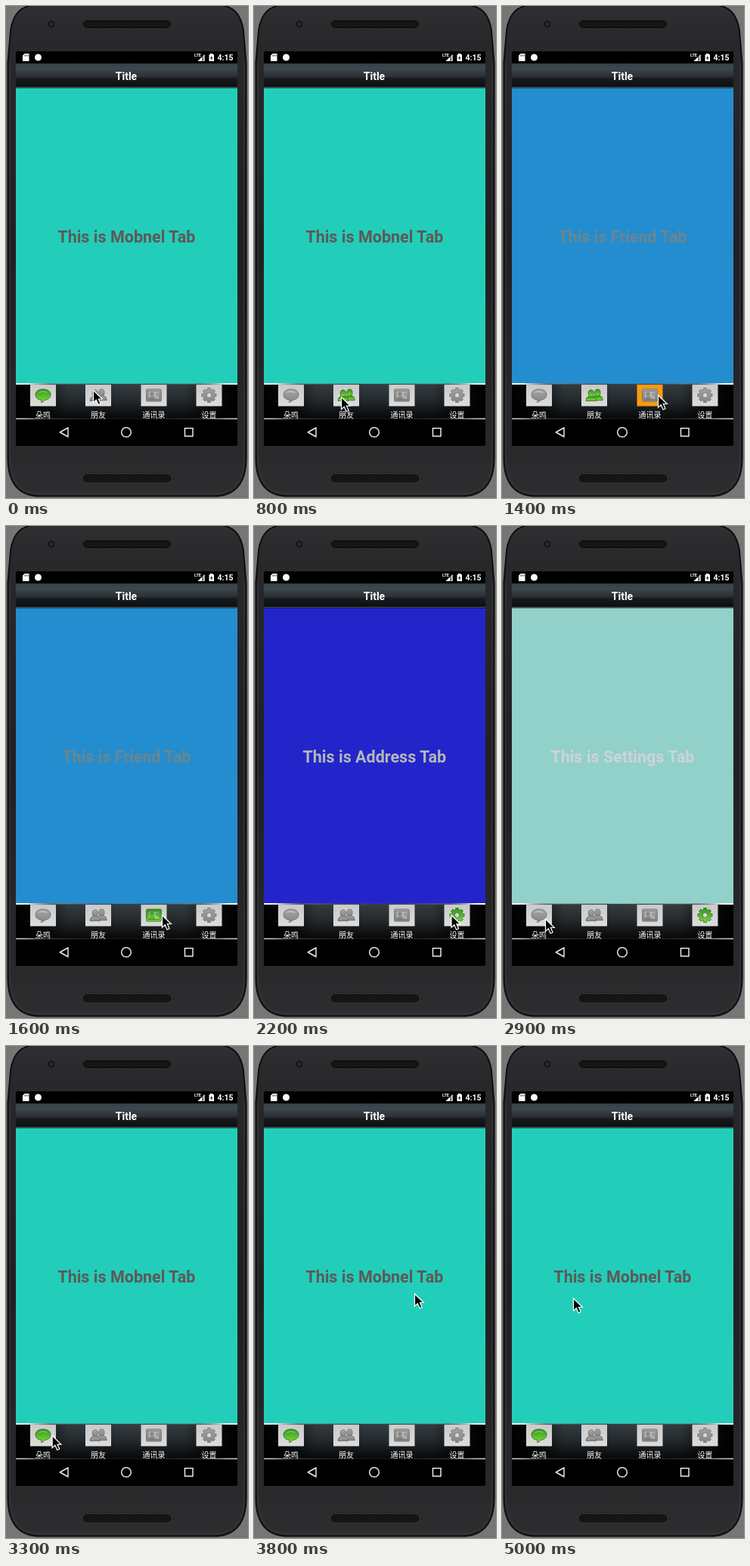
An HTML page for the animation above (5.1 s loop, 320 by 651 pixels).

```html
<!DOCTYPE html>
<html lang="en">
<head>
<meta charset="utf-8">
<title>Tab demo</title>
<style>
html, body { margin: 0; width: 100%; height: 100%; overflow: hidden; background: #777575; }
svg { display: block; width: 100%; height: 100%; }
text { font-family: Roboto, sans-serif; text-anchor: middle; }
.label { font: 10px "Noto Sans CJK SC", "Noto Sans CJK", sans-serif; fill: #fff; }
</style>
</head>
<body>
<svg id="stage" viewBox="0 0 320 651">
  <defs>
    <linearGradient id="body" x2="0" y2="1">
      <stop offset="0" stop-color="#303033"/>
      <stop offset=".06" stop-color="#29292c"/>
      <stop offset=".5" stop-color="#202022"/>
      <stop offset=".9" stop-color="#29292b"/>
      <stop offset="1" stop-color="#2d2d30"/>
    </linearGradient>
    <linearGradient id="bar" x2="0" y2="1">
      <stop offset="0" stop-color="#343f46"/>
      <stop offset=".2" stop-color="#3d484e"/>
      <stop offset=".55" stop-color="#293035"/>
      <stop offset=".62" stop-color="#171b1e"/>
      <stop offset="1" stop-color="#0c0e10"/>
    </linearGradient>
    <linearGradient id="tabs" x2="0" y2="1">
      <stop offset="0" stop-color="#353d42"/>
      <stop offset=".45" stop-color="#24292c"/>
      <stop offset="1" stop-color="#050607"/>
    </linearGradient>
    <linearGradient id="sides">
      <stop offset="0" stop-color="#000"/>
      <stop offset=".06" stop-color="#000" stop-opacity=".9"/>
      <stop offset=".24" stop-color="#000" stop-opacity="0"/>
      <stop offset=".76" stop-color="#000" stop-opacity="0"/>
      <stop offset=".94" stop-color="#000" stop-opacity=".9"/>
      <stop offset="1" stop-color="#000"/>
    </linearGradient>
    <linearGradient id="shine">
      <stop offset="0" stop-color="#fff"/>
      <stop offset=".05" stop-color="#eee"/>
      <stop offset=".17" stop-color="#777" stop-opacity=".5"/>
      <stop offset=".5" stop-color="#555" stop-opacity=".15"/>
      <stop offset=".83" stop-color="#777" stop-opacity=".5"/>
      <stop offset=".95" stop-color="#eee"/>
      <stop offset="1" stop-color="#fff"/>
    </linearGradient>
    <linearGradient id="tile" x2="0" y2="1">
      <stop offset="0" stop-color="#c9c9c9"/>
      <stop offset="1" stop-color="#dddddd"/>
    </linearGradient>
    <linearGradient id="gray" x2="0" y2="1">
      <stop offset="0" stop-color="#a6a6a6"/>
      <stop offset="1" stop-color="#858585"/>
    </linearGradient>
    <linearGradient id="green" x2="0" y2="1">
      <stop offset="0" stop-color="#2f9422"/>
      <stop offset="1" stop-color="#86dc35"/>
    </linearGradient>
    <pattern id="mesh" width="3" height="3" patternUnits="userSpaceOnUse">
      <rect width="3" height="3" fill="#121213"/>
      <circle cx="1.5" cy="1.5" r=".8" fill="#252527"/>
    </pattern>
  </defs>

  <rect width="320" height="651" fill="#777575"/>
  <path id="shell" d="M45 -2H275C301 -2 311 11 314 33L317.5 75V600C317 630 304 648.5 275 648.5H45C16 648.5 3 630 2.5 600V75L6 33C9 11 19 -2 45 -2Z" fill="url(#body)" stroke="#0d0d0e" stroke-width="2"/>
  <path d="M5.2 76V598C6 627 18 645.5 46 645.5H274C302 645.5 314 627 314.8 598V76" fill="none" stroke="#3b3b3e"/>
  <circle cx="60" cy="24" r="4.5" fill="#18181a"/>
  <circle cx="60" cy="24" r="2" fill="#2f2f36"/>
  <g fill="url(#mesh)" stroke="#09090a">
    <rect x="102.5" y="19.5" width="115" height="9" rx="4.5"/>
    <rect x="102.5" y="620.5" width="115" height="9" rx="4.5"/>
  </g>

  <rect x="13" y="60" width="293" height="522"/>
  <g fill="#fff">
    <path d="M24.5 63H30.5V73H22V65.5Z"/>
    <path d="M25 64.5V66.5M27 64.5V66.5M29 64.5V66.5" stroke="#000" stroke-width=".8"/>
    <circle cx="42.5" cy="68" r="4.5"/>
    <text x="253.5" y="67" font-size="5.5" font-weight="700">LTE</text>
    <path d="M262.5 64V73H253.5Z" fill="#777"/>
    <path d="M259 67.5V73H253.5Z"/>
    <path d="M262.5 64V73H261.3V65Z"/>
    <path d="M270 63H273.5V64.2H275V73H268.5V64.2H270Z"/>
    <path d="M272.5 65.5L270 69.3H271.6L271 72L273.6 68.2H272Z" fill="#000"/>
    <text x="290" y="72" font-size="10.5" font-weight="600">4:15</text>
  </g>

  <rect x="13" y="76" width="293" height="32" fill="url(#bar)"/>
  <path d="M13 107.5H306" stroke="#4b4f51"/>
  <text x="159" y="98" font-size="14" font-weight="700" fill="#fff">Title</text>

  <rect id="page" x="13" y="108.5" width="293" height="391.5"/>
  <text id="caption" x="159.3" y="312.5" font-size="21.5" font-weight="700"></text>

  <rect x="13" y="500" width="293" height="47" fill="url(#tabs)"/>
  <rect x="13" y="500" width="293" height="47" fill="url(#sides)"/>
  <rect x="13" y="499" width="293" height="2" fill="url(#shine)"/>
  <rect x="13" y="545.5" width="293" height="1.2" fill="url(#shine)"/>
  <g id="bar-items"></g>

  <rect x="13" y="547" width="293" height="35"/>
  <g fill="none" stroke="#e8e8e8" stroke-width="1.5">
    <path d="M82 558V570L71.3 564Z" stroke-linejoin="round"/>
    <circle cx="159" cy="564" r="6.3"/>
    <rect x="236.5" y="558.7" width="10.5" height="10.5"/>
  </g>
  <path id="cursor" d="M0 0V16.2L3.8 12.7L6.6 19L9.6 17.7L6.9 11.5H11.8Z" fill="#000" stroke="#fff" stroke-width="1.2"/>
</svg>
<script>
const LOOP = 5100, STEP = 100;
const $ = id => document.getElementById(id);

// Cog outline with eight teeth around the centre
function cog() {
  const pts = [];
  for (let i = 0; i < 8; i++) {
    [[-0.29, 7.2], [-0.19, 9.6], [0.19, 9.6], [0.29, 7.2]].forEach(([da, r]) => {
      const a = i * Math.PI / 4 + da;
      pts.push((r * Math.cos(a)).toFixed(2) + " " + (r * Math.sin(a)).toFixed(2));
    });
  }
  return "M" + pts.join("L") + "Z";
}

const person = (x, y) => `<g transform="translate(${x} ${y})">
  <path d="M-6.8 7.5C-7 3.5 -4.5 1.8 -2 1.3H2C4.5 1.8 7 3.5 6.8 7.5Z"/>
  <ellipse cy="-2.6" rx="3.6" ry="4.5"/></g>`;

const icons = [
  `<path d="M0 -8C6 -8 10 -5 10 -.8C10 3.2 6.5 5.8 2.5 6.3C1.5 7.8 -.5 9.2 -3 9.4C-1.6 8.3 -1.5 7.3 -1.9 6.4C-6.8 6 -10 3.2 -10 -.8C-10 -5 -6 -8 0 -8Z"/>
   <path d="M-7 -2.6C-5 -6.8 4.5 -7 7 -2.6C3 -4 -3 -4 -7 -2.6Z" fill="#fff" fill-opacity=".3" stroke="none"/>`,
  person(4.4, -.8) + person(-4.2, 0),
  `<rect x="-10" y="-8" width="20" height="16" rx="1.5"/>
   <rect x="-7.5" y="-5.5" width="15" height="11" fill="#fff" fill-opacity=".25" stroke-width=".7"/>
   <circle cx="-2.5" cy="-1.8" r="2.2"/>
   <path d="M-6 5.3C-5.5 1 .5 1 1 5.3ZM3 -2.5H6.5M3 0H6.5"/>`,
  `<path d="${cog()}"/><circle r="3.4" fill="#d5d5d5"/>`
];

const tabs = [
  { x: 49, label: "朵鸣", name: "Mobnel", bg: "#22ceba", ink: "#5f5856" },
  { x: 122, label: "朋友", name: "Friend", bg: "#238dd0", ink: "#6d858c" },
  { x: 195.5, label: "通讯录", name: "Address", bg: "#2424cb", ink: "#b0b9b5" },
  { x: 268.5, label: "设置", name: "Settings", bg: "#91d1c9", ink: "#cfd2d8" }
];

$("bar-items").innerHTML = tabs.map((tab, i) => `
  <rect class="tile" x="${tab.x - 17}" y="501" width="34" height="28.5"/>
  <g class="icon" transform="translate(${tab.x} 515)" stroke-width=".9">${icons[i]}</g>
  <text class="label" x="${tab.x}" y="544.5">${tab.label}</text>`).join("");
const tiles = document.querySelectorAll(".tile");
const marks = document.querySelectorAll(".icon");

// Each tap: press, highlight, then page change
const taps = [
  { tab: 1, press: 600, lit: 800, show: 900 },
  { tab: 2, press: 1400, lit: 1600, show: 1700 },
  { tab: 3, press: 2000, lit: 2200, show: 2300 },
  { tab: 0, press: 3000, lit: 3200, show: 3300 }
];

// Pointer stops: time, x, y
const stops = [
  [0, 115.5, 508.5], [300, 115.5, 517.5], [950, 115.5, 517.5],
  [1350, 206.5, 515], [1600, 206.5, 515], [2000, 261, 515],
  [2350, 261, 515], [2850, 57.5, 520], [3250, 57.5, 520],
  [3800, 212.5, 328], [4200, 212.5, 328], [4900, 94.5, 334], [5100, 94.5, 334]
];

function pointer(t) {
  const i = stops.findIndex((s, k) => k && t <= s[0]);
  const [a, b] = [stops[i - 1], stops[i]];
  const p = (t - a[0]) / (b[0] - a[0]);
  const e = p * p * (3 - 2 * p);
  return [a[1] + (b[1] - a[1]) * e, a[2] + (b[2] - a[2]) * e];
}

function render(t) {
  let lit = 0, page = 0, pressed = -1;
  for (const tap of taps) {
    if (t >= tap.press && t < tap.lit) pressed = tap.tab;
    if (t >= tap.lit) lit = tap.tab;
    if (t >= tap.show) page = tap.tab;
  }
  const tab = tabs[page];
  $("page").setAttribute("fill", tab.bg);
  $("caption").setAttribute("fill", tab.ink);
  $("caption").textContent = `This is ${tab.name} Tab`;
  tabs.forEach((_, i) => {
    const on = i === lit;
    tiles[i].setAttribute("fill", i === pressed ? "#f79a13" : "url(#tile)");
    marks[i].setAttribute("fill", on ? "url(#green)" : "url(#gray)");
    marks[i].setAttribute("stroke", on ? "#2f7424" : "#707070");
  });
  $("cursor").setAttribute("transform", `translate(${pointer(t)})`);
}

const start = performance.now();
function tick() {
  const t = (performance.now() - start) % LOOP;
  render(Math.floor(t / STEP) * STEP);
  requestAnimationFrame(tick);
}
render(0);
requestAnimationFrame(tick);
</script>
</body>
</html>
```
